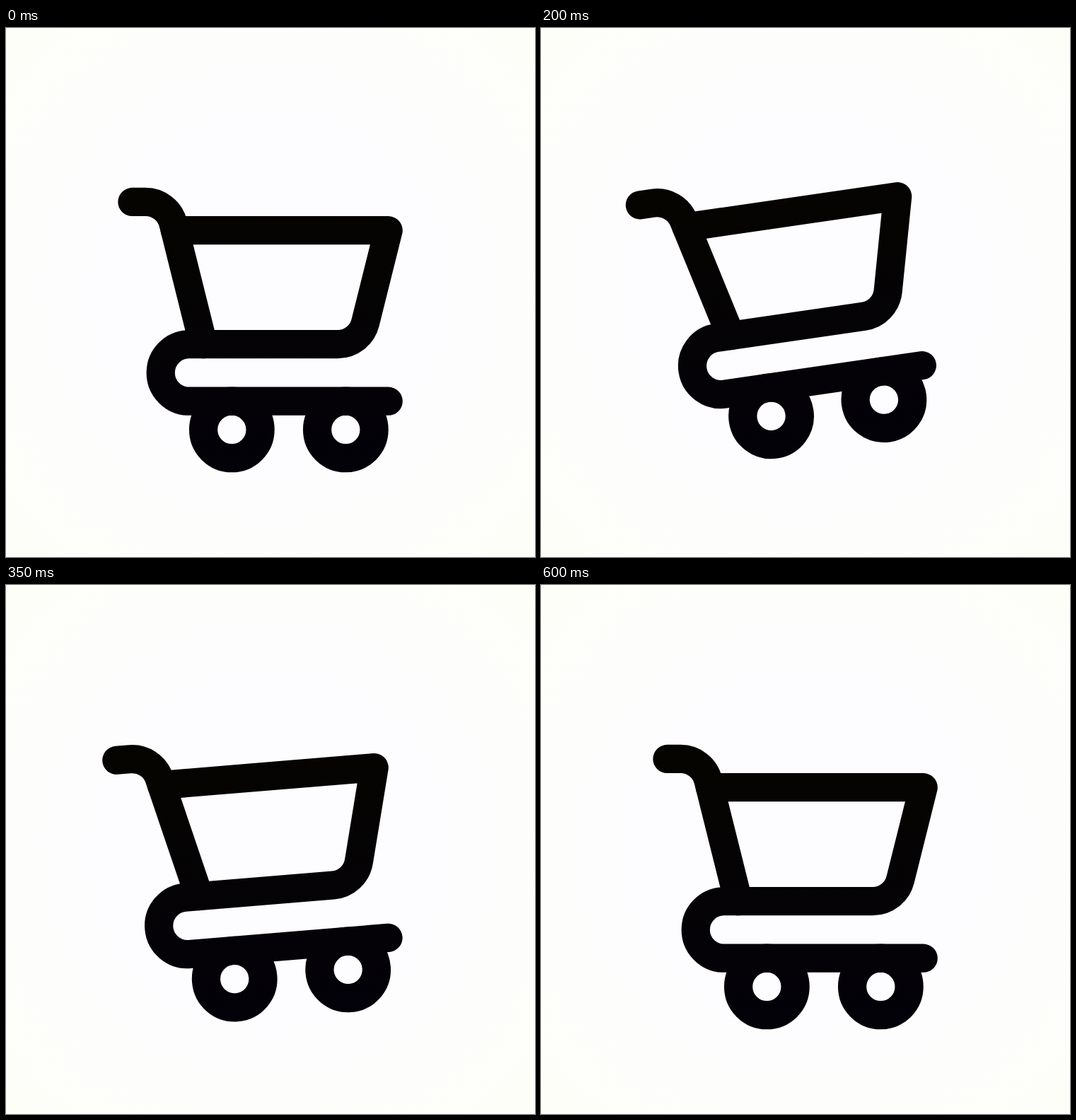
Write an HTML page that moves like this. It is 748 by 748 pixels and loops after 700 ms.

```html
<!DOCTYPE html>
<html lang="en">
<head>
<meta charset="utf-8">
<title>Cart</title>
<style>
  html, body { margin: 0; width: 100%; height: 100%; overflow: hidden; }
  body { background: radial-gradient(circle, #fdfdff 45%, #fefef8); }
  svg { display: block; width: 100%; height: 100%; }
</style>
</head>
<body>
<svg viewBox="0 0 748 748">
  <linearGradient id="ink" gradientUnits="userSpaceOnUse" x1="0" y1="3" x2="0" y2="22">
    <stop stop-color="#050400"/>
    <stop offset="1" stop-color="#030109"/>
  </linearGradient>
  <g transform="translate(138.2 185.6) scale(20.125)">
    <g id="cart" fill="none" stroke="url(#ink)" stroke-width="2" stroke-linecap="round" stroke-linejoin="round">
      <path d="M2 3h.94a2 2 0 0 1 1.94 1.515L7 13"/>
      <path d="M5 5H20l-1.62 6.485A2 2 0 0 1 16.44 13H6a2 2 0 0 0 0 4H20"/>
      <circle cx="9" cy="19" r="2"/>
      <circle cx="17" cy="19" r="2"/>
    </g>
  </g>
</svg>
<script>
  const LOOP = 700, STEP = 50;
  const START = 79, PEAK = 263, END = 421;
  const MAX_TILT = 11.2;
  const cart = document.getElementById('cart');

  // Sine ease from 0 to 1 between two times
  function ease(t, from, to) {
    const p = Math.min(1, Math.max(0, (t - from) / (to - from)));
    return (1 - Math.cos(Math.PI * p)) / 2;
  }

  function draw() {
    const time = performance.now() % LOOP;
    const t = Math.floor(time / STEP) * STEP;
    const tilt = MAX_TILT * (ease(t, START, PEAK) - ease(t, PEAK, END));
    cart.setAttribute('transform', `rotate(${-tilt} 2.55 16.38)`);
    requestAnimationFrame(draw);
  }
  draw();
</script>
</body>
</html>
```
